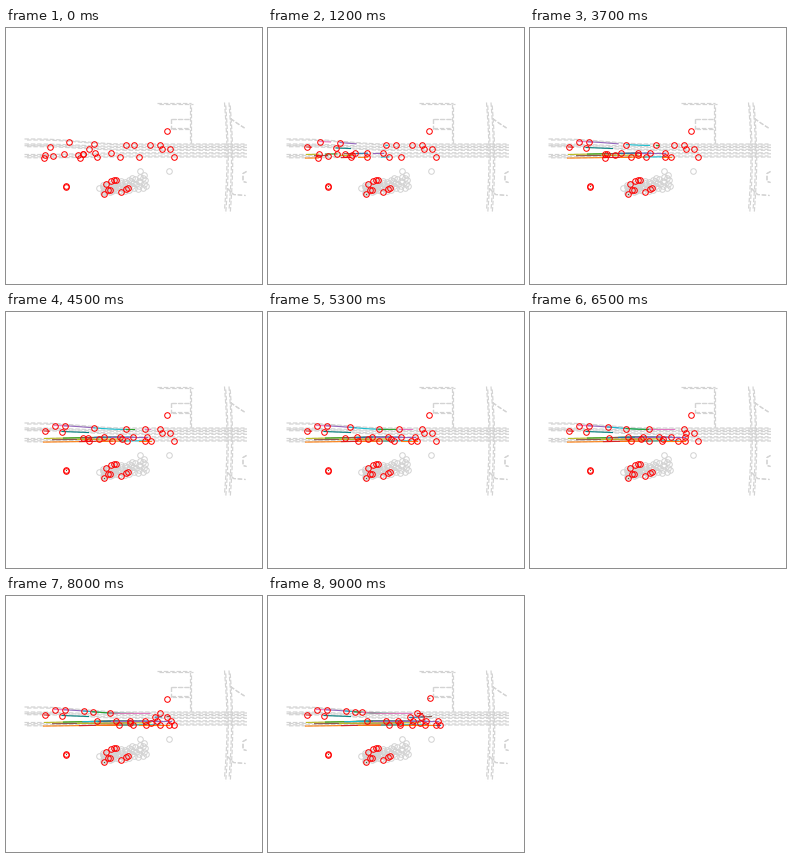
A matplotlib script for the animation above (9.1 s loop, 256 px wide and 256 px high).

```python
import numpy as np
import matplotlib.pyplot as plt
from matplotlib.animation import FuncAnimation

SIZE, DPI = 256, 64
PX = 72 / DPI  # points per pixel
FRAMES, STEP = 91, 100
RING = dict(ls="none", marker="o", mfc="none", ms=5.6 * PX, mew=1.0 * PX)
GREY = "lightgray"
rng = np.random.default_rng(4)
t = np.arange(FRAMES) * STEP / 1000

fig = plt.figure(figsize=(SIZE / DPI, SIZE / DPI), dpi=DPI, facecolor="white")
ax = fig.add_axes([0, 0, 1, 1])
ax.set(xlim=(-0.5, SIZE - 0.5), ylim=(SIZE - 0.5, -0.5))
ax.axis("off")


def smooth(u):
    u = np.clip(u, 0, 1)
    return u * u * (3 - 2 * u)


# how a vehicle's x develops over time
def brake(x0, x1, stop):
    return x1 + (x0 - x1) * (1 - np.clip(t / stop, 0, 1)) ** 2


def glide(x0, x1, start, stop):
    return x0 + (x1 - x0) * smooth((t - start) / (stop - start))


def roll(x0, speed, wait=0.0, drag=0.0):
    s = np.clip(t - wait, 0, None)
    return x0 + speed * s - drag * s * s


# lane centre lines, y as a function of x
def lane(y0, y1, x0, x1):
    return lambda x: y0 + (y1 - y0) * np.clip((x - x0) / (x1 - x0), 0, 1)


def upper(x):
    return 113.1 + 3.8 * smooth((x - 48) / 70)


def draw_road(x, y, dx=0.0, dy=0.0):
    """Dashed kerb made of two nearly coincident lines."""
    for k in (0, 1):
        ax.plot(np.asarray(x) + k * dx, np.asarray(y) + k * dy,
                ls="--", color=GREY, lw=1.2 * PX, zorder=1)


# main road
xs = np.linspace(18, 238, 60)
for y0, y1 in [(110.5, 115.5), (115.5, 118), (117.2, 120.8),
               (126, 124.3), (128.3, 127.5)]:
    draw_road(xs, y0 + (y1 - y0) * smooth((xs - 30) / 90), dx=2.5, dy=1)

# side streets
draw_road([150, 184], [74.5, 74.5], dx=2, dy=0.8)
draw_road([183, 183], [75, 114], dx=1, dy=3)
for y in (90, 99.5):
    draw_road([164, 183], [y, y], dx=1, dy=0.8)
draw_road([164, 164], [90, 100])
for x in (218, 222.5):
    ys = np.linspace(74, 182, 40)
    draw_road(x + 2.5 * np.sin(np.pi * (ys - 74) / 108), ys, dx=1.2, dy=3)
draw_road([224, 231, 238], [90, 95, 99.5])
draw_road([240, 236.5, 236.5, 240], [143, 145, 153, 154])
draw_road([221, 227, 239], [160, 166, 167])

# parking lot
n = 58
spot = np.arange(n)
px = 96 + 45 * (spot / n) ** 1.25 + rng.uniform(-1, 1, n)
py = 164.5 - 0.08 * (px - 96) - (9 + 0.15 * (px - 96)) * (spot * 0.618 % 1)
ax.plot([*px, 92, 133, 162], [*py, 159, 142.5, 142.5], color=GREY, zorder=2, **RING)

# vehicles that never move
ax.plot([59, 59.3, 99, 104, 107.5, 109, 97, 101.5, 103.5, 114, 119.8, 121.3],
        [157, 158, 155, 152, 151.3, 151, 165.7, 161.7, 161.5, 163.2, 160, 159.3],
        color="red", zorder=5, **RING)
specks = ax.plot([59.2, 97], [157.7, 165.7], ls="none", marker="o",
                 ms=1.2 * PX, mew=0, color="#4d5a1c", zorder=4)[0]

side = lane(119, 120, 55, 82)
level = lane(121, 120, 141, 163)
top = lane(126, 124.6, 38, 104)
middle = lane(127.2, 126.2, 46, 144)
bottom = lane(129.6, 128.3, 37, 132)

# westbound traffic queues up, then moves on one by one
cars = [
    ("C6", upper, brake(62, 48, 2.3)),
    ("C4", upper, brake(87.5, 58, 3.7)),
    ("C3", lane(118.5, 118.7, 38, 43), brake(43, 38, 1.5)),
    ("teal", side, brake(82, 55.5, 3.7)),
    ("C9", upper, glide(119, 77, 0.5, 6.5)),
    ("C2", upper, glide(127, 86, 3.1, 8.1)),
    ("C6", upper, roll(143.5, -10.1, 4)),
    ("C3", upper, roll(153.7, -5, 8)),
    ("C0", level, roll(155, -7.7, 7.2)),
    ("C5", level, roll(163, -8, 7.7)),
]

# eastbound traffic flows and slows down gently: start, speed, colour
flow = {
    top: [(38, 10.4, "C8"), (57, 9.7, "C2"), (76, 9.2, "C5"),
          (88, 9.3, "C0"), (104, 8.95, "C4")],
    middle: [(46, 11.1, "C5"), (71, 10.6, "C8")],
    bottom: [(37, 10.9, "C1"), (73, 8.1, "C3"), (90, 7.6, "C1"), (113, 6.5, "C9")],
}
cars += [(color, path, roll(x0, v, drag=0.18))
         for path, group in flow.items() for x0, v, color in group]

# late starters
cars += [
    ("C9", top, roll(76.3, 8, 6.2)),
    ("C1", bottom, roll(132, 5, 2)),
    ("C0", bottom, roll(167, 4, 8)),
    ("C7", lane(102.3, 101.8, 160, 162), roll(160.3, 1, 8)),
]

tracks = [(x, path(x)) for _, path, x in cars]
trails = [ax.plot([], [], color=color, lw=1.1 * PX, zorder=3)[0]
          for color, _, _ in cars]
rings = ax.plot([], [], color="red", zorder=5, **RING)[0]


def draw(i):
    for trail, (x, y) in zip(trails, tracks):
        trail.set_data(x[:i + 1], y[:i + 1])
    rings.set_data([x[i] for x, _ in tracks], [y[i] for _, y in tracks])
    specks.set_visible(i > 0)
    return [*trails, rings, specks]


anim = FuncAnimation(fig, draw, frames=FRAMES, interval=STEP,
                     repeat=True, repeat_delay=0, blit=False)
plt.show()
```
